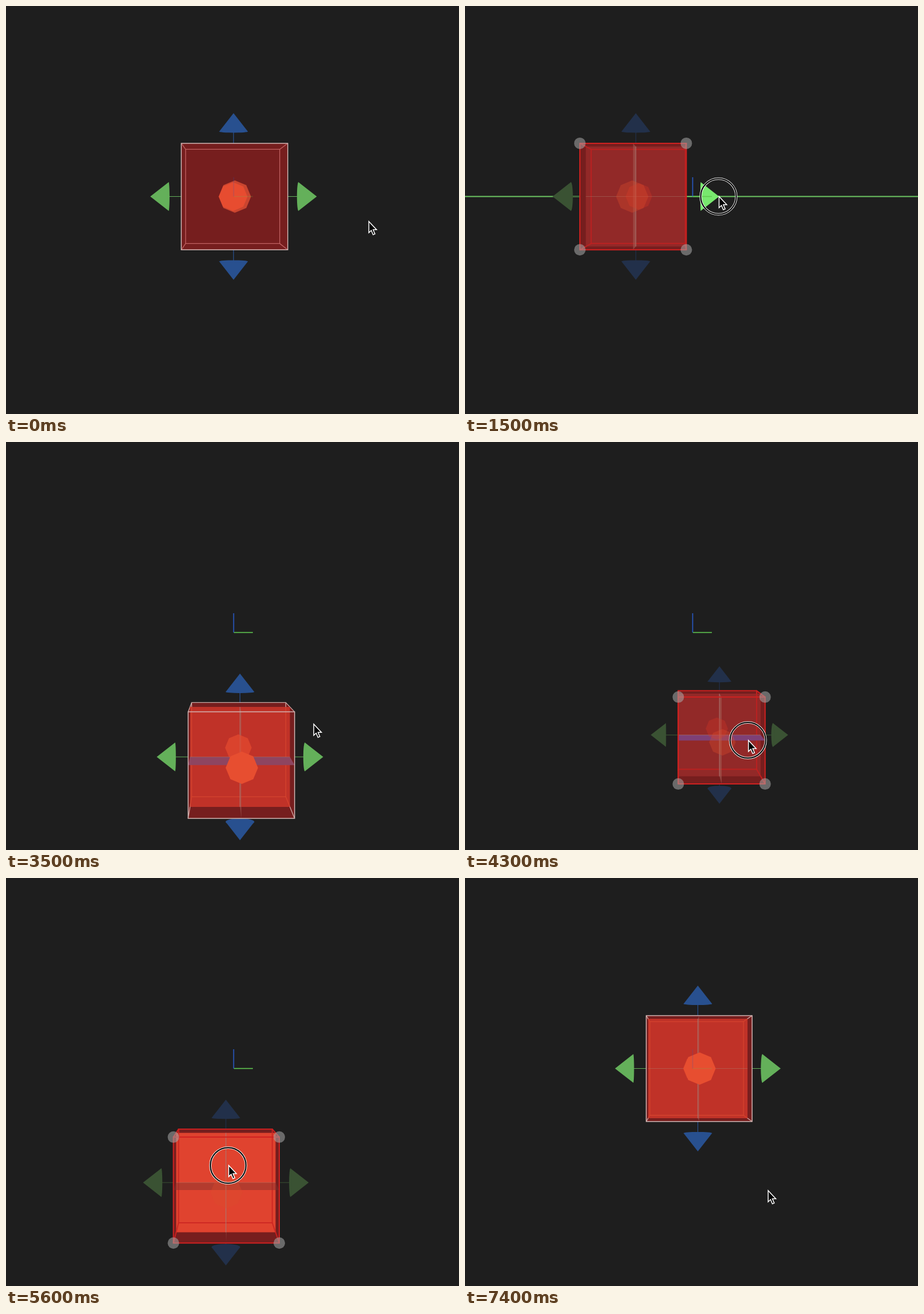
An HTML page with a canvas for the animation above (7.5 s loop, 789 by 710 pixels).

```html
<!DOCTYPE html>
<html>
<head>
<meta charset="utf-8">
<style>
html, body { margin: 0; width: 100%; height: 100%; overflow: hidden; background: #1e1e1e; }
canvas { display: block; }
</style>
</head>
<body>
<canvas id="stage" width="789" height="710"></canvas>
<script>
const ctx = document.getElementById('stage').getContext('2d');
const LOOP = 7500, STEP = 100;
const DEPTH = 1415, HALF = 87, EYE = [370, 330];
const CONE_BASE = 113, CONE_TIP = 145, CONE_R = 25;

// Box centre: time, x, y, depth
const boxKeys = [
  [0, 26.3, 1.5, 0], [600, 26.3, 1.5, 0], [800, 130, 1.5, 0], [1000, 242, 1.5, 0],
  [1350, -179, 1.5, 0], [1500, -72.5, 1.5, 0], [1700, 37.5, 1.5, 0], [2200, 37.5, 1.5, 0],
  [2400, 37.5, -141, 0], [2600, 37.5, -117, 0], [3000, 37.5, 233, 0], [3200, 37.5, 218, 0],
  [4000, 37.5, 218, 0], [4200, 103, 218, 75], [4500, 60, 218, 750], [4800, -88, 218, 330],
  [4900, -95.4, 218, 145], [5100, -40, 218, 464], [5300, 12, 218, 7], [5500, 12, 218, 7],
  [5600, 13, 201, 7], [5800, -21, -10, 7], [5900, 110, -94, 7], [6000, 232, 50, 7],
  [6100, 168, 169, 7], [6300, 40, 90, 7], [6400, 10, -9, 7], [6600, 20, 4, 7],
  [6900, 38, -2, 7], [7200, 35.7, 1.5, 7], [7500, 35.7, 1.5, 7]
];
// Pointer while nothing is held
const pointerKeys = [
  [0, 631, 374], [600, 540, 330], [1800, 552, 330], [2200, 423, 204], [3300, 423, 421],
  [3500, 535, 490], [3900, 467, 558], [4000, 467, 558], [5300, 442, 557], [5500, 386, 516],
  [7200, 409, 300], [7400, 527, 543]
];
// Start, end, grabbed part, grab point relative to the centre
const drags = [
  [600, 1800, 'x', 144, -1], [2200, 3300, 'y', 15.5, -127],
  [4000.5, 5300, 'floor', 60, 10], [5500, 7200, 'face', 4, -31]
];

function sample(keys, t) {
  let i = 0;
  while (i < keys.length - 2 && t >= keys[i + 1][0]) i++;
  const a = keys[i], b = keys[i + 1];
  const u = Math.min(1, (t - a[0]) / (b[0] - a[0]));
  return a.slice(1).map((v, n) => v + (b[n + 1] - v) * u);
}

function project(x, y, z) {
  const k = DEPTH / (DEPTH + z);
  return [EYE[0] + x * k, EYE[1] + y * k, k];
}

function trace(points) {
  ctx.beginPath();
  points.forEach(p => ctx.lineTo(p[0], p[1]));
  ctx.closePath();
}
function fill(points, color) { trace(points); ctx.fillStyle = color; ctx.fill(); }
function outline(points, color, width) {
  trace(points);
  ctx.strokeStyle = color;
  ctx.lineWidth = width;
  ctx.stroke();
}
function line(a, b, color, width) { outline([a, b], color, width); }
function disc(x, y, r, color) {
  ctx.beginPath();
  ctx.arc(x, y, r, 0, 7);
  ctx.fillStyle = color;
  ctx.fill();
}
function octagon(p, r, color) {
  fill(Array.from({ length: 8 }, (_, i) => {
    const a = i * Math.PI / 4;
    return [p[0] + r * Math.cos(a), p[1] + r * Math.sin(a)];
  }), color);
}

function arrow(box, dx, dy, color) {
  const at = (d, w) => project(box[0] + dx * d + dy * w, box[1] + dy * d + dx * w, box[2]);
  const base = at(CONE_BASE, 0), r = CONE_R * base[2];
  line(at(0, 0), at(130, 0), color, 1.2);
  fill([at(CONE_TIP, 0), at(CONE_BASE, CONE_R), at(CONE_BASE, -CONE_R)], color);
  const rx = dx ? Math.abs(base[0] - EYE[0]) * .018 : r;
  const ry = dy ? Math.abs(base[1] - EYE[1]) * .018 : r;
  ctx.beginPath();
  ctx.ellipse(base[0], base[1], rx, ry, 0, 0, 7);
  ctx.fill();
}

function originAxes(alpha) {
  ctx.globalAlpha = alpha;
  line([396.5, 298], [396.5, 331.5], '#2a58c4', 1.6);
  line([397, 331.5], [430, 331.5], '#62c950', 1.6);
  ctx.globalAlpha = 1;
}

function drawBox([x, y, z], mode, fresh) {
  const corner = (sx, sy, dz) => project(x + sx * HALF, y + sy * HALF, z + dz);
  const square = dz => [[-1, -1], [1, -1], [1, 1], [-1, 1]].map(c => corner(c[0], c[1], dz));
  const front = square(-HALF), middle = square(0), back = square(HALF);
  const sides = front.map((p, i) => [p, front[(i + 1) % 4], back[(i + 1) % 4], back[i]]);

  [back, ...sides, front].forEach(q => fill(q, '#761e1e'));
  const edge = mode ? '#c81f1f' : fresh ? '#c06262' : '#cda9a5';
  const width = mode ? 2 : 1.3;
  if (!fresh) {
    outline(back, edge, width);
    front.forEach((p, i) => line(p, back[i], edge, width));
    fill(middle, mode === 'face' ? '#e0432f' : mode ? '#922928' : '#c03228');
  }
  // Edges seen through the middle slice
  ctx.globalAlpha = fresh ? 1 : .75;
  const inner = fresh ? edge : mode ? '#c81f1f' : '#dc4a30';
  ctx.save();
  if (!fresh) { trace(middle); ctx.clip(); }
  outline(back, inner, width);
  front.forEach((p, i) => line(p, back[i], inner, width));
  ctx.restore();
  ctx.globalAlpha = 1;

  if (!fresh) {
    const floor = mode === 'floor' ? '#7e4076' : mode ? 'rgba(125,50,45,.45)' : '#8e4560';
    fill([corner(-1, 0, 0), corner(1, 0, 0), corner(1, 0, -HALF), corner(-1, 0, -HALF)], floor);
    fill([corner(0, -1, 0), corner(0, 1, 0), corner(0, 1, -HALF), corner(0, -1, -HALF)],
      'rgba(165,100,90,.5)');
    line(corner(-1, 0, 0), corner(1, 0, 0), 'rgba(170,125,110,.45)', 1.2);
    line(corner(0, -1, 0), corner(0, 1, 0), 'rgba(170,125,120,.6)', 1.5);
  }

  const far = project(x, y, z + CONE_BASE), near = project(x, y, z - CONE_BASE);
  ctx.globalAlpha = mode === 'face' ? 0 : mode ? .3 : .7;
  octagon(far, CONE_R * far[2], mode ? '#d93526' : '#e54b30');
  ctx.globalAlpha = mode ? .35 : 1;
  octagon(near, CONE_R * near[2] + 1, fresh ? '#c9452f' : mode ? '#d94a2c' : '#e74e30');
  if (fresh) octagon([near[0] - 3, near[1]], 25, '#e74c30');
  ctx.globalAlpha = 1;

  outline(front, mode ? '#d02120' : '#d3b5b3', mode ? 2 : 1.5);
  if (mode) front.forEach(p => disc(p[0], p[1], 10, 'rgba(170,170,170,.55)'));
}

function drawPointer(x, y, held) {
  if (held) {
    ctx.beginPath();
    ctx.arc(x, y + 1, 31, 0, 7);
    ctx.strokeStyle = '#eee';
    ctx.lineWidth = 4;
    ctx.stroke();
    ctx.strokeStyle = '#000';
    ctx.lineWidth = 2;
    ctx.stroke();
  }
  const shape = [[1, 1], [1, 20.5], [5.2, 16.5], [8.4, 24], [11.6, 22.7], [8.4, 15.3], [14.4, 15.3]]
    .map(p => [x + p[0], y + p[1]]);
  fill(shape, '#000');
  outline(shape, '#fff', 1.5);
}

function draw(t) {
  const box = sample(boxKeys, t);
  const drag = drags.find(d => t >= d[0] && t < d[1]);
  const mode = drag && drag[2], fresh = t < 600;
  const centre = project(...box);
  const tint = (axis, active, idle, dim) => mode === axis ? active : mode ? dim : idle;
  const green = tint('x', '#78e86e', '#64b05a', '#3a5233');
  const blue = tint('y', '#2460c2', '#28508f', '#22304a');

  ctx.fillStyle = '#1e1e1e';
  ctx.fillRect(0, 0, 789, 710);
  if (mode === 'x') line([0, centre[1]], [789, centre[1]], '#6cc562', 2);
  if (mode === 'y') line([centre[0], 0], [centre[0], 710], '#36599c', 2);
  arrow(box, -1, 0, mode === 'x' ? '#3a5233' : green);
  arrow(box, 1, 0, green);
  arrow(box, 0, -1, blue);
  arrow(box, 0, 1, mode === 'y' ? '#22304a' : blue);
  originAxes(1);
  drawBox(box, mode, fresh);
  originAxes(.2);

  const [px, py] = drag
    ? [centre[0] + drag[3] * centre[2], centre[1] + drag[4] * centre[2]]
    : sample(pointerKeys, t);
  drawPointer(px, py, drag);
}

const start = performance.now();
function frame() {
  const t = (performance.now() - start) % LOOP;
  draw(Math.floor(t / STEP) * STEP);
  requestAnimationFrame(frame);
}
frame();
</script>
</body>
</html>
```
